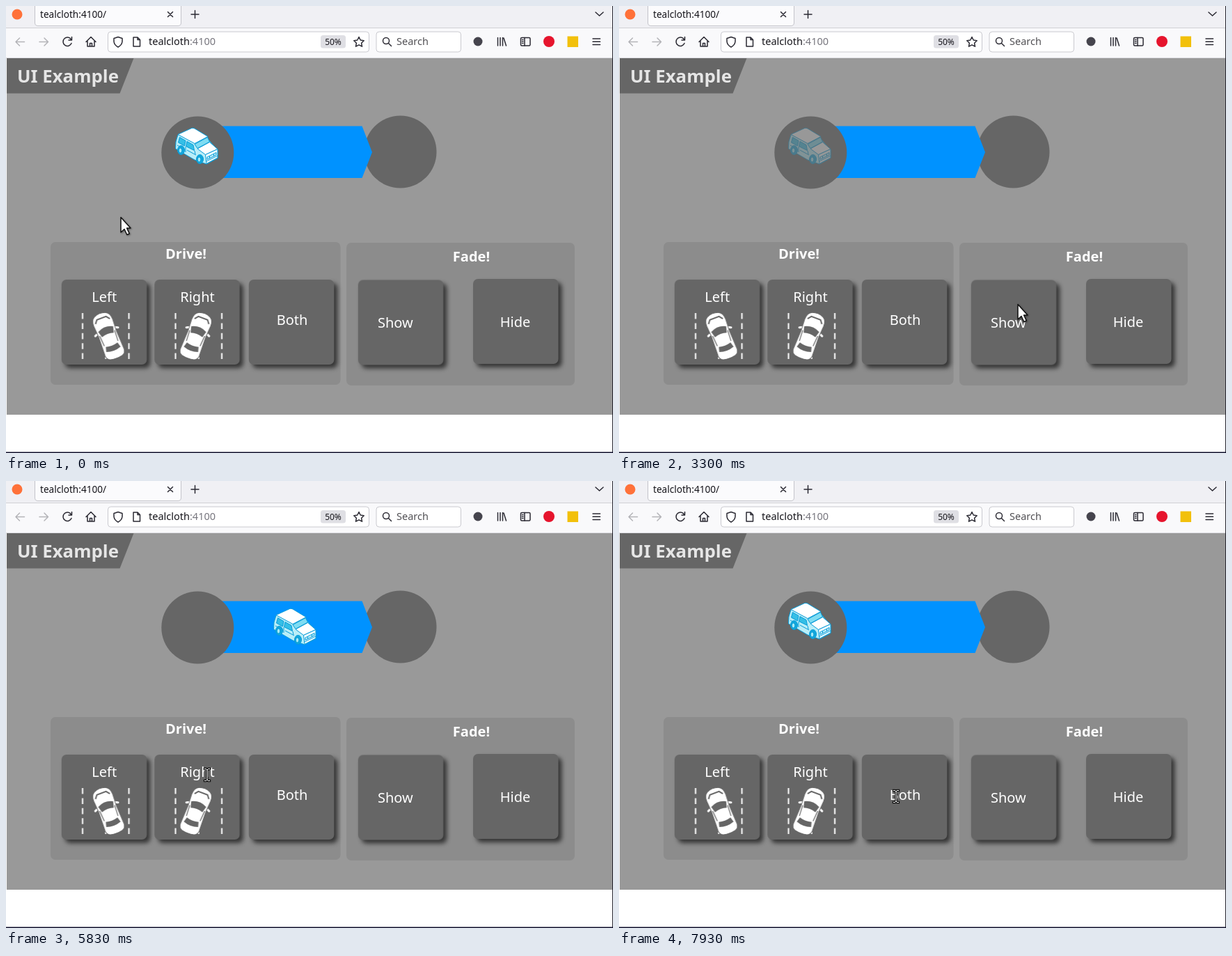
Animation, 872 px wide and 642 px high, one loop 8 s. Source, as an HTML page:

```html
<!DOCTYPE html>
<html lang="en">
<head>
<meta charset="utf-8">
<title>UI Example</title>
<style>
  html, body { margin: 0; width: 100%; height: 100%; overflow: hidden; background: #fff; }
  svg { display: block; width: 872px; height: 642px; }
  text { font-family: "Noto Sans", sans-serif; }
  .line { fill: none; stroke: #2b2a33; stroke-width: 1.5; stroke-linecap: round; stroke-linejoin: round; }
  .dim { stroke: #b4b4b8; }
  .ui { font-size: 14.5px; fill: #15141a; }
  .soft { fill: #77767e; }
  .head { font-size: 20px; font-weight: 700; fill: #fff; text-anchor: middle; }
  .btn text { font-size: 20px; fill: #fff; text-anchor: middle; }
  .btn rect { width: 122.5px; height: 122px; rx: 7px; }
  .shade { x: 5px; y: 5px; fill: rgba(0, 0, 0, .62); filter: blur(3px); }
  .face { fill: #666; }
  .press > * { animation: press 8s linear var(--at) infinite; }
  #car { animation: fade 8s linear infinite, drive 8s linear infinite; }
  #pointer { animation: point 8s ease-in-out infinite; }
  #arrow { animation: arrow 8s step-end infinite; }
  #beam { animation: beam 8s step-end infinite; }

  @keyframes press { 0% { opacity: 0; } 2.75%, 100% { opacity: 1; } }
  @keyframes fade {
    0%, 16.25% { opacity: 1; }
    28.75%, 37.125% { opacity: 0; }
    49.625%, 100% { opacity: 1; }
  }
  @keyframes drive {
    0%, 66.97% { transform: translate(0, 0); }
    66.975% { transform: translate(0, 8px); }
    79.475%, 85.62% { transform: translate(298px, 8px); }
    85.625% { transform: translate(300px, 0); }
    98.125%, 100% { transform: translate(0, 0); }
  }
  @keyframes point {
    0%, 1.25% { transform: translate(165px, 303px); }
    4.625%, 6.625% { transform: translate(571px, 421px); }
    8.375%, 23.125% { transform: translate(735px, 430px); }
    26.25%, 50% { transform: translate(573px, 428px); }
    54.625%, 57.875% { transform: translate(291px, 377px); }
    59.625%, 74.375% { transform: translate(289px, 422px); }
    77.125% { transform: translate(180px, 440px); }
    80%, 93.125% { transform: translate(152px, 443px); }
    95.5% { transform: translate(262px, 446px); }
    98.75%, 100% { transform: translate(398px, 453px); }
  }
  @keyframes arrow { 0% { opacity: 1; } 58.75% { opacity: 0; } 74.75% { opacity: 1; } 98.4%, 100% { opacity: 0; } }
  @keyframes beam { 0% { opacity: 0; } 58.75% { opacity: 1; } 74.75% { opacity: 0; } 98.4%, 100% { opacity: 1; } }
</style>
</head>
<body>
<svg viewBox="0 0 872 642">
  <defs>
    <g id="lane">
      <path d="M-33.3-33V33M33.3-33V33M0-33V33" fill="none" stroke="#fff" stroke-width="2" stroke-dasharray="8.6 5.8"/>
      <g transform="translate(3.5 -.5) rotate(-21)">
        <path d="M-17.5-6L-13-8M17.5-6L13-8" stroke="#fff" stroke-width="3" stroke-linecap="round"/>
        <path d="M-9-32Q0-36 9-32Q14.500-29 14.500-20L13.500-3L14.500 26Q14 32 9 33.500Q0 35.500-9 33.500Q-14 32-14.500 26L-13.500-3L-14.500-20Q-14.500-29-9-32Z" fill="#fff" stroke="#666" stroke-width="1"/>
        <path d="M-11-22L-7-27H7L11-22" fill="none" stroke="#666" stroke-width="2"/>
        <path d="M-11.500-10Q0-16 11.500-10L9-1Q0-4-9-1Z" fill="#666"/>
        <path d="M-9 14Q0 16.500 9 14L11 21Q0 25-11 21Z" fill="#666"/>
        <path d="M-11.500-4L-10.500 12M11.500-4L10.500 12" stroke="#666" stroke-width="1.200"/>
      </g>
    </g>
  </defs>

  <!-- browser bar -->
  <rect width="872" height="32" fill="#f0f0f4"/>
  <path d="M41.500-2V24Q41.500 28.500 46 28.500H247Q251.500 28.500 251.500 24V-2Z" fill="#fbfbfd" stroke="#c4c4ca"/>
  <rect y="31" width="872" height="44" fill="#f9f9fb"/>
  <path d="M0 31.500H872" stroke="#d0d0d4"/>
  <path d="M0 74.500H872" stroke="#dcdce0"/>
  <circle cx="16" cy="12" r="7.500" fill="#ff7139"/>
  <text class="ui" x="49" y="16.500" style="font-size:13.6px">tealcloth:4100/</text>
  <path class="line" d="M232.500 8.500l7 7m0-7l-7 7M266 12h11M271.500 6.500v11M847 9l5.500 5 5.500-5"/>
  <path class="line dim" d="M26.500 51.500H14m5.500-5.500L14 51.500l5.500 5.500M48 51.500H60.500m-5.500-5.500 5.500 5.500L55 57"/>
  <path class="line" d="M93.500 48A6.200 6.200 0 1 0 94 53.500M94.500 44.500V49H90"/>
  <path class="line" d="M115 51.500L122 44.500 129 51.500M117 50.500V58H127V50.500M120.500 58V53.500H123.500V58"/>

  <rect x="146.500" y="37" width="375" height="29" rx="4" fill="#fff" stroke="#c9c9cf"/>
  <path class="line" d="M161 44.500L167 46.500V51Q166.500 56 161 59Q155.500 56 155 51V46.500Z"/>
  <path class="line" d="M183 45H189L192.500 48.500V58H183ZM189 45V48.500H192.500"/>
  <text class="ui" x="205" y="56">tealcloth<tspan class="soft">:4100</tspan></text>
  <rect x="452" y="42" width="36" height="18.500" rx="3.500" fill="#dfdfe4"/>
  <text class="ui" x="470" y="55.500" text-anchor="middle" style="font-size:12px">50%</text>
  <path class="line" d="M507 44.500L509.200 49 514.200 49.700 510.600 53.200 511.500 58.200 507 55.800 502.500 58.200 503.400 53.200 499.800 49.700 504.800 49Z"/>
  <rect x="532" y="37" width="121.500" height="29" rx="4" fill="#fff" stroke="#c9c9cf"/>
  <path class="line" d="M550.500 50A4.500 4.500 0 1 1 541.500 50A4.500 4.500 0 1 1 550.500 50M549.500 53.500L553.500 57.500"/>
  <text class="ui" x="561" y="56" fill-opacity=".75">Search</text>
  <circle cx="678" cy="51" r="6.500" fill="#45444d"/>
  <path class="line" d="M706.500 45.500V57M710 45.500V57M713.500 45.500V57M715 46L718.500 57"/>
  <rect class="line" x="739.500" y="45.500" width="13.500" height="11.500" rx="1.500"/>
  <path class="line" d="M745 45.500V57M741.500 48.500h1.500m-1.500 2.500h1.500m-1.500 2.500h1.500"/>
  <circle cx="780" cy="51" r="8" fill="#e6142d"/>
  <rect x="806.500" y="43.500" width="15.500" height="15.500" fill="#f2c00c"/>
  <path class="line" d="M843 47H853.500M843 51.200H853.500M843 55.400H853.500"/>

  <!-- page -->
  <rect x="1" y="75" width="870" height="512" fill="#999"/>
  <path d="M1 75H183.500L163.500 125.500H1Z" fill="#666"/>
  <text x="16" y="110" font-size="25.800" font-weight="700" fill="#e6e6e6">UI Example</text>

  <circle cx="566.500" cy="209.500" r="52" fill="#666"/>
  <path d="M290 172.500H511.500L526 210 511.500 247H290Z" fill="#0092ff"/>
  <circle cx="275.300" cy="210.500" r="52" fill="#666"/>

  <rect x="64" y="339" width="416.500" height="205" rx="7" fill="#8c8c8c"/>
  <rect x="489" y="340" width="328" height="205" rx="7" fill="#8c8c8c"/>
  <text class="head" x="258.500" y="363">Drive!</text>
  <text class="head" x="668.500" y="367">Fade!</text>

  <g class="btn press" style="--at:6.83s" transform="translate(79.800 393)">
    <rect class="shade"/><rect class="face"/>
    <text x="61.500" y="32">Left</text>
    <use href="#lane" x="63.500" y="81"/>
  </g>
  <g class="btn press" style="--at:5.36s" transform="translate(213.300 393)">
    <rect class="shade"/><rect class="face"/>
    <text x="61.700" y="32">Right</text>
    <use href="#lane" transform="translate(63.500 81) scale(-1 1)"/>
  </g>
  <g class="btn" transform="translate(348.800 393)">
    <rect class="shade"/><rect class="face"/>
    <text x="62.300" y="65">Both</text>
  </g>
  <g class="btn press" style="--at:2.97s" transform="translate(505.800 393.500)">
    <rect class="shade"/><rect class="face"/>
    <text x="53.500" y="68">Show</text>
  </g>
  <g class="btn press" style="--at:1.31s" transform="translate(671 392)">
    <rect class="shade"/><rect class="face"/>
    <text x="60.500" y="69">Hide</text>
  </g>

  <g id="car" stroke="#079bd8" stroke-width="1" stroke-linejoin="round">
    <path d="M247 185L244 195 243.500 205 271 221 288 227 304 218.500 304 207 290 191 269 175.500Z" fill="#b9eef8"/>
    <path d="M247 184.500L267 175.300Q269 175 271 176L290 187.500 271 197.500Z" fill="#fff"/>
    <path d="M249.500 188.500L258 193.500 256.500 201 247.500 196ZM260 194.500L269 199.500 270.500 207.500 258.500 201.500Z" fill="#35bfe6"/>
    <path d="M271 198.500L289.500 188.500 292.500 195 275 204.500Z" fill="#7fdcf2"/>
    <path d="M275 205L292.500 195.500 304 205.500 286.500 213.500Z" fill="#fff"/>
    <path d="M286.500 213.500L304 205.500V218L288 226.500Z" fill="#eefbff"/>
    <path d="M289 217L302 210.500V214L289 220.500ZM292.500 215.500V219M298.500 212.500V216M288 223L304 215" fill="#bdeefa"/>
    <path d="M258 202V210M271 208L272 213M246 200L257 206M260 207L273 214" fill="none"/>
    <ellipse cx="251.500" cy="207" rx="5" ry="6.500" fill="#12a8dc"/>
    <ellipse cx="250.500" cy="207.500" rx="2.300" ry="3.500" fill="#a6ebf7"/>
    <ellipse cx="278.500" cy="220" rx="5" ry="6.500" fill="#12a8dc"/>
    <ellipse cx="277.500" cy="220.500" rx="2.300" ry="3.500" fill="#a6ebf7"/>
  </g>

  <path d="M871.500 0V642" stroke="#24242e"/>
  <rect y="640.500" width="872" height="1.500" fill="#10102c"/>

  <g id="pointer">
    <path id="arrow" d="M0 .5V22L5 17.500 8.800 25.500 12.300 24 8.600 16H14Z" fill="#fff" stroke="#111" stroke-width="1.500" stroke-linejoin="round" style="filter:drop-shadow(1px 1px 1px rgba(0,0,0,.4))"/>
    <g id="beam" fill="none" stroke-linecap="square">
      <path d="M-3.500-8.500H-1.500L0-7 1.500-8.500H3.500M0-7V7M-3.500 8.500H-1.500L0 7 1.500 8.500H3.500" stroke="#111" stroke-width="3.400"/>
      <path d="M-3.500-8.500H-1.500L0-7 1.500-8.500H3.500M0-7V7M-3.500 8.500H-1.500L0 7 1.500 8.500H3.500" stroke="#fff" stroke-width="1"/>
    </g>
  </g>
</svg>
</body>
</html>
```
